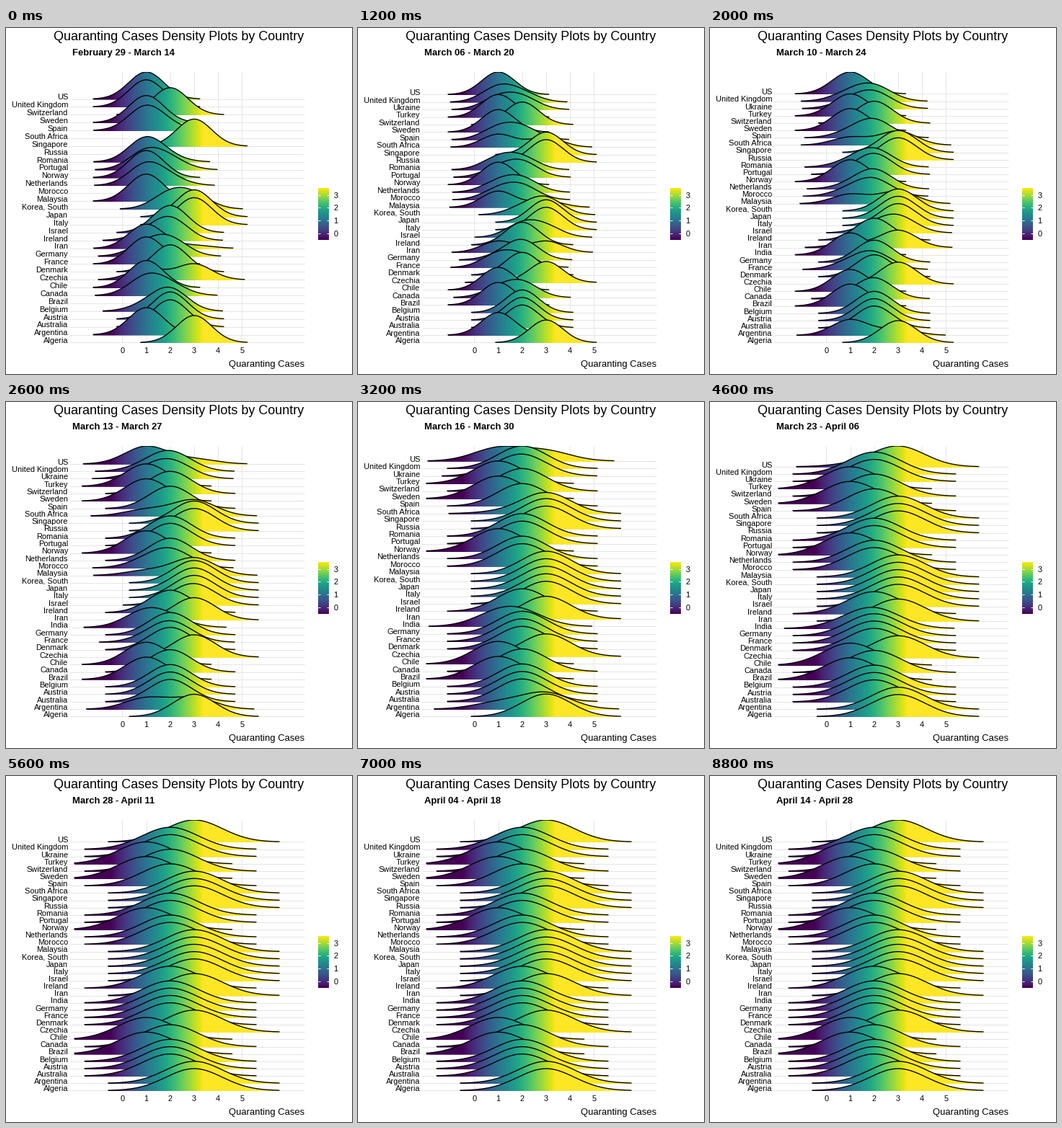
Write a matplotlib script that moves like this. It is 480x480 px and loops after 9 s.

```python
import numpy as np
import matplotlib.pyplot as plt
from matplotlib.animation import FuncAnimation
from matplotlib.patches import Rectangle
from matplotlib.path import Path

plt.rcParams["font.family"] = "Liberation Sans"

SIZE, DPI = 480, 80
PT = 72 / DPI                      # points per pixel
FRAMES, LAST_DAY, WINDOW = 45, 45, 14
LEFT, RIGHT, TOP, BOTTOM = 88, 414, 61, 436.4
X0, UNIT = 161.4, 33.2             # pixel position of 0, pixels per level
SCALE, MIN_HEIGHT = 3, 0.01
LOW, HIGH = -0.5, 3.4              # colour limits

# Bottom to top: name, level, [later level, day of the switch], [first day]
COUNTRIES = [
    ("Algeria", 3), ("Argentina", 1, 3, 20), ("Australia", 2), ("Austria", 2),
    ("Belgium", 1, 2, 6, 4), ("Brazil", 1, 1, 13, 13), ("Canada", 1, 2, 11),
    ("Chile", 1), ("Czechia", 1, 3, 7, 2), ("Denmark", 2),
    ("France", 1, 2, 14), ("Germany", 1, 2, 8, 4), ("India", 1, 2, 25, 20),
    ("Iran", 1, 3, 13), ("Ireland", 1, 2, 6, 4), ("Israel", 2, 3, 14),
    ("Italy", 3), ("Japan", 3), ("Korea, South", 2, 3, 10),
    ("Malaysia", 1, 3, 16), ("Morocco", 1, 2, 16, 13),
    ("Netherlands", 1, 2, 12), ("Norway", 1), ("Portugal", 1, 2, 11),
    ("Romania", 1, 2, 13), ("Russia", 3, 3, 13, 13), ("Singapore", 3),
    ("South Africa", 1, 3, 17, 13), ("Spain", 1, 2, 13), ("Sweden", 1),
    ("Switzerland", 2), ("Turkey", 1, 1, 14, 14), ("Ukraine", 1, 2, 17, 14),
    ("United Kingdom", 1, 2, 15), ("US", 1, 3, 24),
]


def px(x):
    return X0 + UNIT * x


def levels(day, first, later=None, switch=99, start=5):
    """Daily levels of one country inside the window that opens on day."""
    days = np.arange(max(day, start), day + WINDOW)
    return np.where(days < switch, first, later or first).astype(float)


def bandwidth(x):
    """Rule-of-thumb kernel width (nrd0)."""
    sd = x.std(ddof=1)
    q1, q3 = np.percentile(x, [25, 75])
    spread = min(sd, (q3 - q1) / 1.34) or sd or abs(x[0])
    return 0.9 * spread * len(x) ** -0.2


def density(x, grid, bw):
    z = (grid[:, None] - x) / bw
    return np.exp(-z * z / 2).mean(axis=1)


def date(day):
    if day == 0:
        return "February 29"
    return f"March {day:02d}" if day <= 31 else f"April {day - 31:02d}"


fig = plt.figure(figsize=(SIZE / DPI, SIZE / DPI), dpi=DPI, facecolor="white")
ax = fig.add_axes([0, 0, 1, 1])
ax.set_xlim(0, SIZE)
ax.set_ylim(SIZE, 0)
ax.axis("off")


def label(x, y, text, size, **kw):
    return ax.text(x, y, text, fontsize=size * PT, color="black",
                   va="baseline", **kw)


def rule(xs, ys, color="#e5e5e5", z=1):
    return ax.plot(xs, ys, color=color, lw=PT, zorder=z,
                   solid_capstyle="butt")[0]


def gradient(values, extent, z):
    return ax.imshow(values, cmap="viridis", vmin=LOW, vmax=HIGH,
                     extent=extent, aspect="auto", interpolation="nearest",
                     zorder=z)


label(66, 17, "Quaranting Cases Density Plots by Country", 18)
subtitle = label(91.5, 38, "", 13, weight="bold")
label(RIGHT, 470, "Quaranting Cases", 13, ha="right")
for n in range(6):
    rule([px(n)] * 2, [TOP, BOTTOM + 0.6])
    label(px(n), 451, str(n), 11, ha="center")

# Colour bar
gradient(np.linspace(HIGH, LOW, 144)[:, None], (433, 448, 294, 222), 2)
for n in range(4):
    y = 284.7 - 17.7 * n
    rule([433, 436], [y, y], "white", 3)
    rule([445, 448], [y, y], "white", 3)
    label(454.5, y + 4.2, str(n), 11)

# Ridges, lower rows in front
panel = Rectangle((LEFT, TOP), RIGHT - LEFT, BOTTOM + 2 - TOP,
                  transform=ax.transData)
strip = np.arange(94, 384)
shades = ((strip + 0.5 - X0) / UNIT)[None, :]
rows = []
for i, (name, *_) in enumerate(COUNTRIES):
    z = 10 + 2 * (len(COUNTRIES) - i)
    fill = gradient(shades, (94, 384, BOTTOM, TOP), z)
    line, = ax.plot([], [], color="black", lw=1.35 * PT, zorder=z + 1,
                    solid_capstyle="projecting")
    line.set_clip_path(panel)
    rows.append((rule([LEFT, RIGHT], [BOTTOM] * 2), fill, line,
                 label(86, 0, name, 11, ha="right")))


def draw(frame):
    day = frame * LAST_DAY // (FRAMES - 1)
    subtitle.set_text(f"{date(day)} - {date(day + 14)}")

    data = [levels(day, *spec) for _, *spec in COUNTRIES]
    ridges = [x for x in data if len(x) > 2]
    shown = sum(len(x) > 0 for x in data)
    bw = np.mean([bandwidth(x) for x in ridges])
    values = np.concatenate(ridges)
    grid = np.linspace(max(-2, values.min() - 3 * bw),
                       values.max() + 3 * bw, 400)
    curves = [density(x, grid, bw) if len(x) > 2 else None for x in data]
    peak = max(c.max() for c in curves if c is not None)
    tall = SCALE * (shown - 1) / (len(ridges) - 1) / peak

    # The panel reaches from the lowest baseline to the highest crest
    crest, rank = 0, 0
    for x, c in zip(data, curves):
        if c is not None:
            crest = max(crest, rank + tall * c.max())
        rank += len(x) > 0
    step = (BOTTOM - TOP) / crest

    rank = 0
    for x, c, (base_line, fill, line, text) in zip(data, curves, rows):
        for part in (base_line, text):
            part.set_visible(len(x) > 0)
        for part in (fill, line):
            part.set_visible(c is not None)
        if not len(x):
            continue
        base = BOTTOM - step * rank
        rank += 1
        base_line.set_ydata([base, base])
        text.set_y(base + 0.8)
        if c is None:
            continue
        keep = c >= MIN_HEIGHT * peak
        xs, ys = px(grid[keep]), base - step * tall * c[keep]
        line.set_data(xs, ys)
        foot = base + 1            # the fill shows just below the line
        outline = np.column_stack([np.r_[xs[0], xs, xs[-1]],
                                   np.r_[foot, ys, foot]])
        fill.set_extent((94, 384, foot, ys.min()))
        fill.set_clip_path(Path(outline), transform=ax.transData)
    return []


anim = FuncAnimation(fig, draw, frames=FRAMES, interval=200,
                     init_func=lambda: draw(0), repeat=True, repeat_delay=0)
plt.show()
```
